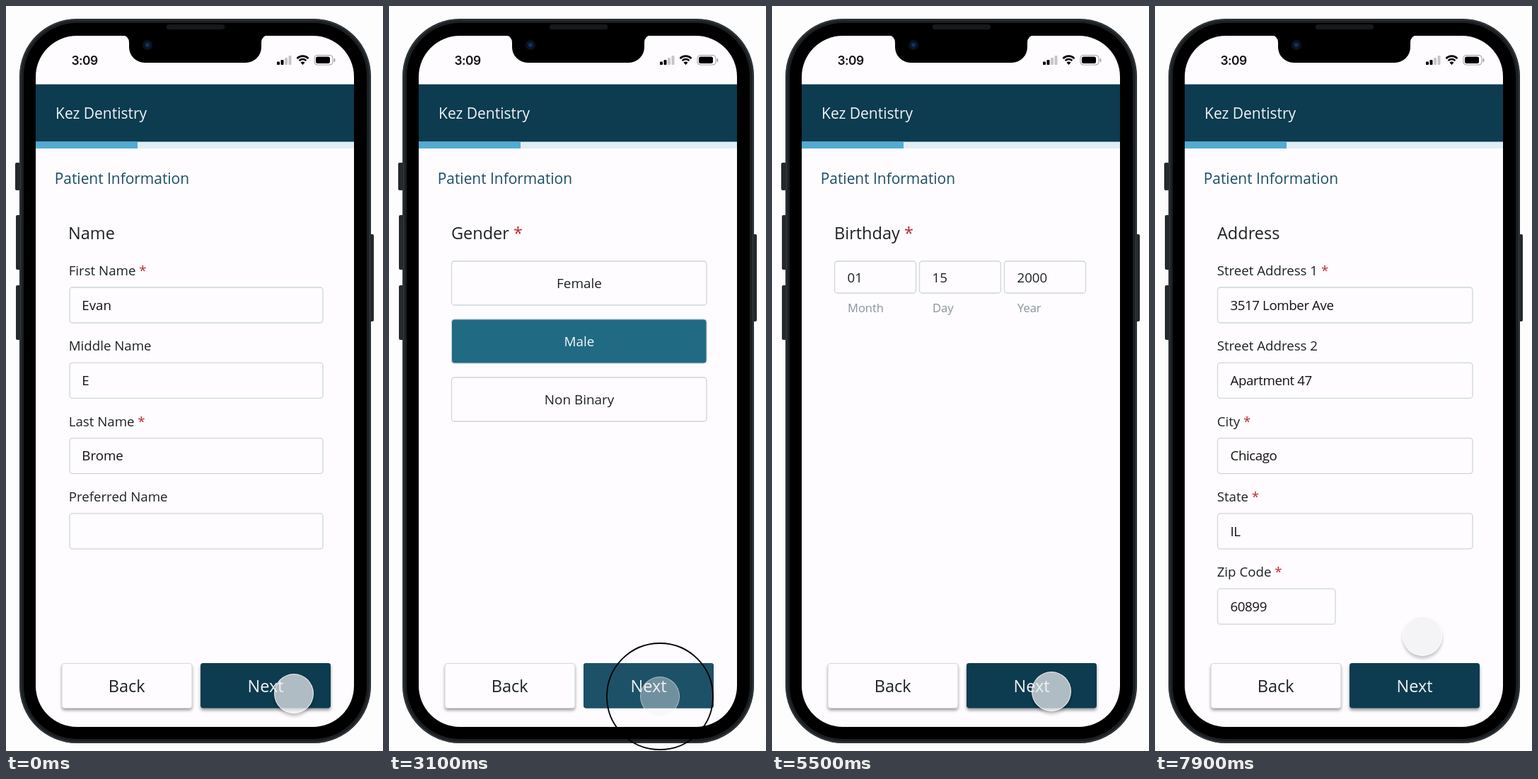
Write an HTML page that moves like this. It is 533 px wide and 1051 px high and loops after 8000 ms.

```html
<!DOCTYPE html>
<html lang="en">
<head>
<meta charset="utf-8">
<title>Patient form</title>
<style>
html, body { margin: 0; width: 100%; height: 100%; overflow: hidden; background: #fefdfe; }
svg { display: block; position: absolute; left: 0; top: 0; }
text { font-family: "Open Sans", sans-serif; white-space: pre; }
#cursor { position: absolute; left: -28px; top: -28px; width: 56px; height: 56px; box-sizing: border-box; border-radius: 50%; }
</style>
</head>
<body>
<svg id="stage" width="533" height="1051" viewBox="0 0 533 1051"></svg>
<div id="cursor"></div>
<script>
const INK = '#1d2125', NAVY = '#0d3b50', LINE = '#cdd6da', PAPER = '#fefcfe';

const rect = (x, y, w, h, r, fill, extra = '') =>
  `<rect x="${x}" y="${y}" width="${w}" height="${h}" rx="${r}" fill="${fill}" ${extra}/>`;
const text = (x, y, size, str, fill = INK, extra = '') =>
  `<text x="${x}" y="${y}" font-size="${size}" fill="${fill}" ${extra}>${str}</text>`;
const mid = 'text-anchor="middle"';
const star = '<tspan fill="#c0282d"> *</tspan>';
const box = (x, y, w, h) => rect(x, y, w, h, 4, PAPER, `stroke="${LINE}" stroke-width="1.3"`);
const group = (id, body) => `<g id="${id}">${body}</g>`;
const page = (n, title, body) =>
  group('page' + n, rect(60, 290, 410, 620, 0, PAPER) + text(88, 329, 23.5, title) + body);

const rowY = i => 397 + 106.3 * i;
const label = (i, str, x = 87.7) => text(x, rowY(i) - 17, 18.7, str);
const value = (i, str, fill, extra, x = 106.5) => text(x, rowY(i) + 31.7, 18.7, str, fill, extra);

function phone() {
  const keys = [[13, 221, 39], [14, 295, 77], [14, 394, 77], [513, 322, 123]];
  return keys.map(([x, y, h]) => rect(x, y, 7, h, 2, '#24292d')).join('') +
    rect(19, 18, 497, 1022, 81, '#1b1f22') +
    rect(20.5, 19.5, 494, 1019, 79, 'none', 'stroke="#30363a" stroke-width="2"') +
    rect(25, 24, 485, 1010, 75, '#000') +
    rect(42, 42, 450, 975, 58, PAPER) +
    '<path d="M164 41Q174 42 174 52V58A22 22 0 0 0 196 80H339A22 22 0 0 0 361 58V52Q361 42 371 41Z"/>' +
    rect(227, 26, 82, 7, 3, '#17191b') +
    '<circle cx="200" cy="55" r="7" fill="#0a1322"/><circle cx="200" cy="55" r="3" fill="#17305a"/>';
}

function statusBar() {
  const bars = [4.5, 7, 10, 13].map((h, i) =>
    rect(383 + 5.5 * i, 83 - h, 4, h, 1, i < 2 ? '#000' : '#c6c5c8')).join('');
  const arc = (r, w) => {
    const d = r * 0.72;
    return `<path d="M${419.5 - d} ${82 - d}A${r} ${r} 0 0 1 ${419.5 + d} ${82 - d}" fill="none" stroke="#000" stroke-width="${w}"/>`;
  };
  return text(92.5, 83, 17.4, '3:09', '#111', 'style="font-family:Inter,sans-serif" font-weight="600" letter-spacing="-0.5"') +
    bars + arc(11, 2.7) + arc(6.8, 2.5) + '<path d="M419.5 83l-3-3.2q3-2.4 6 0z"/>' +
    rect(436, 69.5, 26, 13.5, 4, 'none', 'stroke="#9c9b9e"') +
    rect(438, 71.5, 20, 9.5, 2.5, '#000') + rect(463.5, 74, 1.8, 5, 1, '#9c9b9e');
}

function header() {
  return rect(42, 110.5, 450, 81.5, 0, NAVY) +
    text(70, 158.5, 21, 'Kez Dentistry', '#f2f5f7') +
    rect(42, 191.5, 450, 9.5, 0, '#dfeef5') + rect(42, 191.5, 144, 9.5, 0, '#51abd3') +
    text(68.8, 251, 20.9, 'Patient Information', '#1a4e68');
}

function namePage() {
  const rows = [['First Name' + star, 'Evan'], ['Middle Name', 'E'], ['Last Name' + star, 'Brome'], ['Preferred Name', '']];
  return page(0, 'Name', rows.map(([l, v], i) =>
    label(i, l, 88.7) + box(90, rowY(i), 358, 50) + value(i, v, '#111', '', 107.3)).join(''));
}

function genderPage() {
  const opts = ['Female', 'Male', 'Non Binary'].map((s, i) =>
    box(88.5, 360 + 82 * i, 360.5, 62) + text(269, 398 + 82.2 * i, 18.9, s, INK, mid)).join('');
  return page(1, 'Gender' + star, opts + group('fill1',
    rect(88.5, 442, 360.5, 62, 4, '#216a83', `stroke="${LINE}"`) + text(269, 480.2, 18.9, 'Male', '#f4f7f8', mid)));
}

function birthdayPage() {
  const parts = [['Month', '01', '01'], ['Day', '01', '15'], ['Year', '2000', '2000']];
  const each = f => parts.map((p, i) => f(p, 88.5 + 120 * i)).join('');
  return page(2, 'Birthday' + star,
    each((p, x) => box(x, 360, 115, 45) + text(x + 18.5, 432, 16.5, p[0], '#87949b')) +
    group('hint2', each((p, x) => text(x + 18, 388.5, 16.5, p[1], '#d2d3d6'))) +
    group('fill2', each((p, x) => text(x + 18, 389.5, 18.7, p[2]))));
}

function addressPage() {
  const rows = [['Street Address 1' + star, '3517 Lomber Ave'], ['Street Address 2', 'Apartment 47'],
    ['City' + star, 'Chicago'], ['State' + star, 'IL'], ['Zip Code' + star, '60899']];
  const values = fill => rows.map((r, i) => value(i, r[1], fill, 'letter-spacing="-0.4"')).join('');
  return page(3, 'Address',
    rows.map((r, i) => label(i, r[0]) + box(88.5, rowY(i), i < 4 ? 360.5 : 166.5, 50)).join('') +
    group('hint3', values('#dddde0')) + group('fill3', values('#111')));
}

function buttons() {
  const shadow = 'style="filter:drop-shadow(0 3px 2px rgba(0,0,0,.4))"';
  const next = (fill, extra) => rect(275, 927, 184, 63.5, 4, fill, extra);
  const word = fill => text(367, 968, 23.5, 'Next', fill, mid);
  return rect(79, 927.5, 184, 63, 4, PAPER, shadow) +
    rect(79, 927.5, 184, 63, 4, 'none', 'stroke="#d3d9dd" stroke-width="1.2"') +
    text(170.6, 968, 23.5, 'Back', INK, mid) +
    group('lift', next(NAVY, shadow)) + next('#e6e4e6') + word('#979699') +
    group('active', next(NAVY) + group('press', next('#1d5168')) + word('#f2f4f5'));
}

const $ = id => document.getElementById(id);
$('stage').innerHTML = phone() + statusBar() + header() +
  namePage() + genderPage() + birthdayPage() + addressPage() + buttons() +
  '<circle id="ring" fill="none" stroke="#000" stroke-width="1.8"/>';

// Taps alternate between the Next button and a form field: [time, x, y]
const taps = [[200, 407, 970], [1800, 347, 479], [3100, 383, 974], [4400, 282, 400],
  [5700, 395, 967], [7068, 315, 539], [8368, 393, 971]];
const LOOP = 8000;

const ramp = (t, a, b) => Math.min(1, Math.max(0, (t - a) / (b - a)));
const ease = p => p < 0.5 ? 2 * p * p : 1 - 2 * (1 - p) ** 2;
const show = (id, v) => $(id).setAttribute('opacity', v);

function draw(t) {
  const fade = taps.map(([at]) => ramp(t, at + 100, at + 300));
  for (let n = 1; n < 4; n++) {
    show('page' + n, fade[2 * n - 2]);
    show('fill' + n, fade[2 * n - 1]);
    if (n > 1) show('hint' + n, 1 - fade[2 * n - 1]);
  }

  let enabled = 1, push = 0, tapped = 0, grow = 0, ringOn = 0, [, x, y] = taps[0];
  taps.forEach(([at, tx, ty], i) => {
    const isNext = i % 2 === 0, down = ramp(t, at - 200, at);
    if (fade[i] > 0) enabled = isNext ? 1 - fade[i] : fade[i];
    if (isNext && t < at + 300) push = Math.max(push, down);
    if (down > 0 && t < at + 110) {
      tapped = down * (1 - ramp(t, at + 30, at + 110));
      ringOn = Math.min(1, down * 4) * (1 - ramp(t, at + 30, at + 100));
      grow = 1 - (1 - down) ** 2;
    }
    if (i) {
      const start = taps[i - 1][0] + 280, p = ease(ramp(t, start, start + 800));
      x += (tx - x) * p;
      y += (ty - y) * p;
    }
  });

  show('active', enabled);
  show('press', push);
  show('lift', enabled * (1 - push));
  show('ring', ringOn);
  const ring = $('ring');
  ring.setAttribute('cx', x);
  ring.setAttribute('cy', y);
  ring.setAttribute('r', 28 + 47 * grow);

  const c = $('cursor').style;
  c.transform = `translate(${x}px,${y}px)`;
  c.background = `rgba(240,240,242,${0.72 - 0.32 * tapped})`;
  c.border = `1.5px solid rgba(255,255,255,${0.8 - 0.4 * tapped})`;
  c.boxShadow = `0 4px 4px rgba(0,0,0,${0.22 * (1 - tapped)})`;
}

const began = performance.now();
function tick() {
  draw((performance.now() - began) % LOOP);
  requestAnimationFrame(tick);
}
tick();
</script>
</body>
</html>
```
